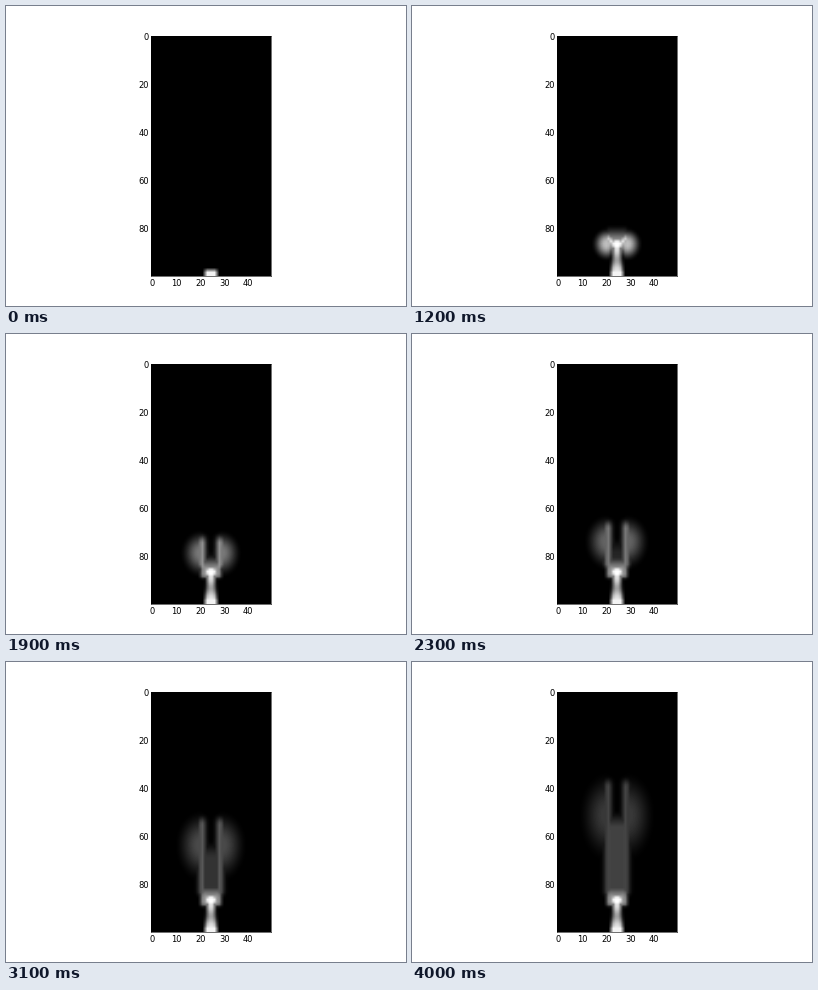
Animation, 400 px wide and 300 px high, one loop 4100 ms. Source, as a matplotlib script:

```python
import numpy as np
import matplotlib.pyplot as plt
from matplotlib.animation import FuncAnimation

FRAMES, STEP = 41, 100
ROWS, COLS, CELL = 100, 50, 2.4
NOZZLE = 238  # height where the jet breaks up, in stage pixels

# Cell centres in stage pixels; the plume is mirrored about its axis.
y = 30 + CELL * (np.arange(ROWS)[:, None] + 0.5)
u = np.abs(CELL * (np.arange(COLS)[None, :] + 0.5) - 60)


def ramp(a, b, v):
    """Smooth step from 0 at a to 1 at b; a may exceed b."""
    s = np.clip((v - a) / (b - a), 0, 1)
    return s * s * (3 - 2 * s)


def source():
    return 0.95 * ramp(8.4, 3.6, u) * ramp(261.6, 266.4, y)


def stem(head):
    """Narrow jet from the source up to the head, at most to the nozzle."""
    end = max(head, NOZZLE)
    half = 4.8 + 1.8 * ramp(248, 268, y)
    level = 0.92 - 0.3 * np.exp(-((y - 254) / 7) ** 2)
    return level * ramp(half + 2, half - 4, u) * ramp(end - 3, end + 3, y)


def cap(s):
    """Steady bright spot where the jet opens into the plume."""
    halo = 0.6 * ramp(13, 7, u) * ramp(218, 237, y) * ramp(246, 241, y)
    heart = ramp(1.5, 0.4, np.hypot(u / 6.5, (y - NOZZLE) / 5))
    return ramp(0.4, 1, s) * np.maximum(halo, heart)


def lobes(s, top, mid, crest):
    outer = 7 + 24 * (1 - np.exp(-s / 1.2)) + 1.5 * s
    du, dy = u - crest, y - mid
    ru = np.where(du > 0, outer - crest, 8)
    ry = np.where(dy > 0, 4 + 10 * s, mid - top)
    level = min(1, 0.9 / max(s, 0.1))
    return level * ramp(1.12, 0.1, np.hypot(du / ru, dy / ry))


def columns(s, top, crest, opening):
    """Two bright walls that rise from the cap into the lobes."""
    centre = 0.9 * crest * ramp(245, 229, y)
    wall = np.exp(-((u - centre) / 4) ** 2)
    level = opening * min(1, 1.1 / max(s, 0.1))
    return level * wall * ramp(top, top + 12, y) * ramp(245, NOZZLE, y)


def core(s, mid):
    rise = ramp(mid - 6, mid + 14, y) * ramp(244, 236, y)
    return 0.065 * s * rise * ramp(12, 6, u)


def density(t):
    s = t / 1000
    top = 263 - 31.5 * s - 1.5 * s * s
    mid = top + 4 + 9 * s
    opening = ramp(0.7, 1.15, s)
    crest = 10 * opening
    return np.maximum.reduce([
        source(), stem(mid), cap(s), lobes(s, top, mid, crest),
        columns(s, top, crest, opening), core(s, mid),
    ])


plt.rcParams.update({"font.family": "DejaVu Sans", "font.size": 12})
fig = plt.figure(figsize=(8, 6), dpi=50, facecolor="white")
ax = fig.add_axes([145 / 400, 0.1, 120 / 400, 0.8])
image = ax.imshow(density(0), cmap="gray", vmin=0, vmax=1,
                  interpolation="bilinear", aspect="auto")
ax.set_xticks(range(0, COLS, 10))
ax.set_yticks(range(0, ROWS, 20))
ax.tick_params(direction="in", length=4, width=0.5, pad=4,
               top=True, right=True)
ax.tick_params(axis="y", pad=3.4)
for label in ax.get_yticklabels():
    label.set_va("center")


def draw(i):
    image.set_data(density(i * STEP))
    return [image]


anim = FuncAnimation(fig, draw, frames=FRAMES, interval=STEP,
                     repeat=True, repeat_delay=0)
plt.show()
```
